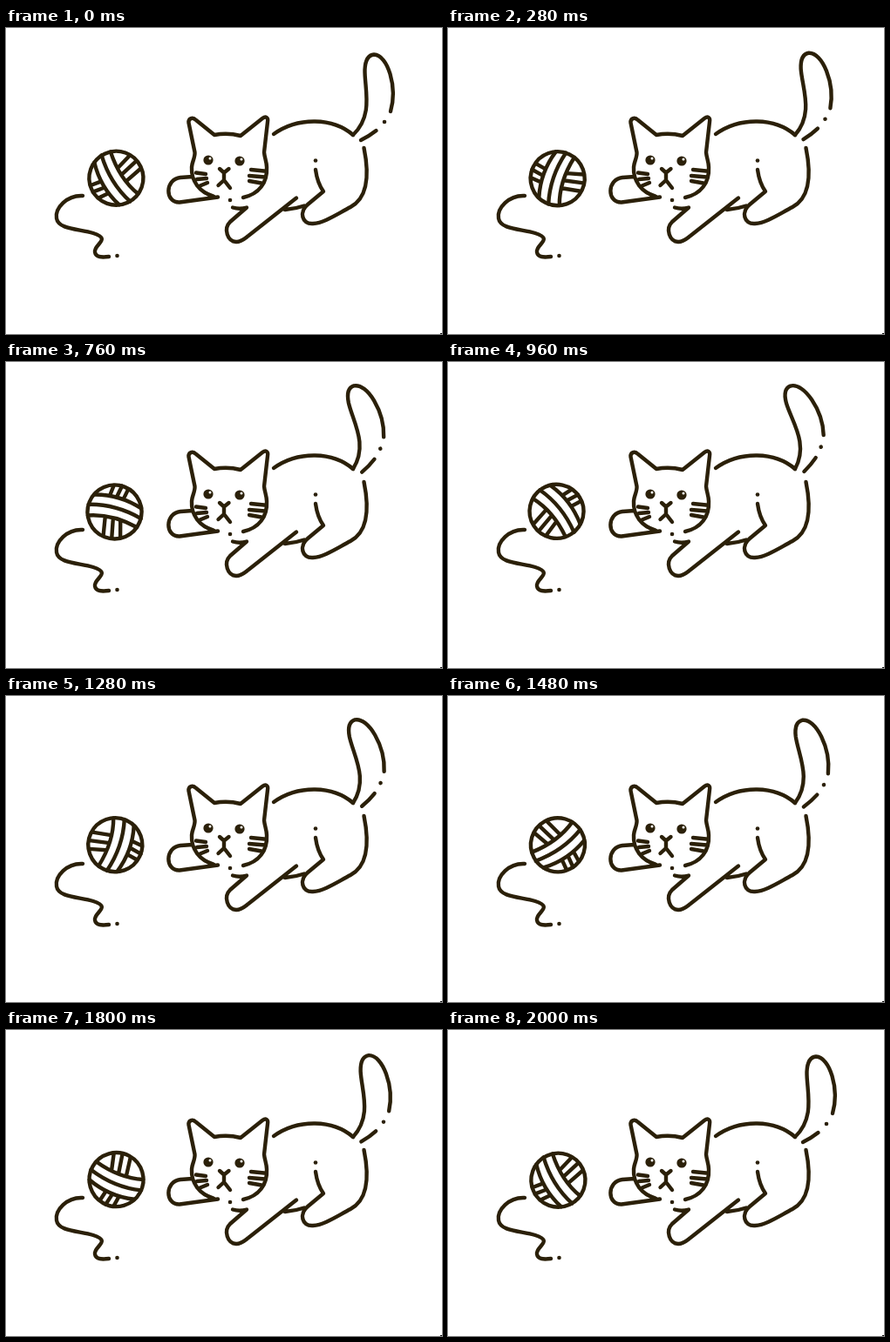
An HTML page with a canvas for the animation above (2040 ms loop, 500 px wide and 352 px high).

```html
<!DOCTYPE html>
<html lang="en">
<head>
<meta charset="utf-8">
<title>Cat and yarn</title>
<style>
html, body { margin: 0; width: 100%; height: 100%; overflow: hidden; background: #fff; }
canvas { display: block; }
</style>
</head>
<body>
<canvas id="stage" width="500" height="352"></canvas>
<script>
const ctx = document.getElementById('stage').getContext('2d');
const INK = '#2b2009';
const LOOP = 2040, STEP = 40, TURN = 2000;
const RAD = Math.PI / 180;

const cat = new Path2D([
  // head and ears
  'M238 193.5C222 189 212 176 213 160C213.3 154 217 149 216.5 143L209.5 109C209 104 214 102 218 106L239 123Q254 120 269 124L294 104C298 101 301 103 300 108L296 143C296.500 149 299 154 299 160C300 178 290 191 272 195',
  // nose and mouth
  'M245 162L250 166.500L255.500 162M250 166.500V175L243.500 181M250 175L257 184',
  // whiskers
  'M218 166.500L229 168M219 174L230 173M222.500 181.500L231 178',
  'M281 163L296 164.500M279 170L297 171.500M279 176L293 178.500',
  // front legs
  'M214 171L200 172C182 174 182 201 199 200.500L243 194.500',
  'M260 206.500Q268 209 276 206.500L257 223C249 231 254 245.500 264 246C270 246 274 242 278 239L333 195.500',
  // belly, hind leg, back
  'M320 209Q332 208 342 204.500',
  'M355 163Q357 178 364 188L346 203C336 211 339 226 352 225C365 224 378 215 395 206C412 197 418 175 410.500 138',
  'M307 122C335 102 375 103 398 123'
].join(''));

const thread = new Path2D('M88 193C70 192 56 207 58 219C60 232 85 231 100 236C122 243 100 249 102 258C103 264 110 264 118 263');

const tail = new Path2D('M398 123C422 100 411 70 411.500 48C412 37 416 31 422 30.500C438 31 449 68 441 96M424.500 118Q417 124 407 129');

const yarn = new Path2D([
  'M-30 -7Q2 -3 27 -15',
  'M-31 4Q2 9 31 -3',
  'M-27 15Q2 21 29 10',
  'M-17 -25L-10 -7M-8 -29L-1 -7M2 -30L8 -9',
  'M-4 17L-5 30M4 17.500L3 31M12 17L12 28'
].join(''));

function disc(x, y, r, color = INK) {
  ctx.fillStyle = color;
  ctx.beginPath();
  ctx.arc(x, y, r, 0, 2 * Math.PI);
  ctx.fill();
}

function eye(x, y) {
  disc(x, y, 5.6);
  disc(x + 2, y - 2, 1.5, '#fff');
}

function drawTail(t) {
  const swing = 1 - Math.abs(t / (TURN / 2) - 1);
  ctx.save();
  ctx.translate(398, 123);
  ctx.rotate(-18.5 * RAD * swing);
  ctx.translate(-398, -123);
  ctx.stroke(tail);
  disc(434, 108, 2.3);
  ctx.restore();
}

function drawBall(t) {
  const spin = 2 * Math.PI * t / TURN;
  ctx.save();
  // the ball turns slightly off its centre
  ctx.translate(125.5, 172.2);
  ctx.rotate(spin);
  ctx.translate(0.9, 0.5);
  ctx.rotate(64.8 * RAD);
  ctx.stroke(yarn);
  ctx.beginPath();
  ctx.arc(0, 0, 31, 0, 2 * Math.PI);
  ctx.stroke();
  ctx.restore();
}

function draw(t) {
  ctx.fillStyle = '#fff';
  ctx.fillRect(0, 0, 500, 352);
  ctx.strokeStyle = INK;
  ctx.lineWidth = 4.4;
  ctx.lineCap = ctx.lineJoin = 'round';

  ctx.stroke(cat);
  ctx.stroke(thread);
  disc(127.5, 262, 2.3);
  disc(257, 198, 2.3);
  disc(355, 152.5, 2.3);
  eye(232, 152);
  eye(268, 153);
  drawTail(t);
  drawBall(t);

  ctx.fillStyle = '#000';
  ctx.fillRect(498, 351, 2, 1);
}

const start = performance.now();
function frame() {
  const t = Math.max(0, performance.now() - start) % LOOP;
  draw(Math.floor(t / STEP) * STEP);
  requestAnimationFrame(frame);
}
frame();
</script>
</body>
</html>
```
